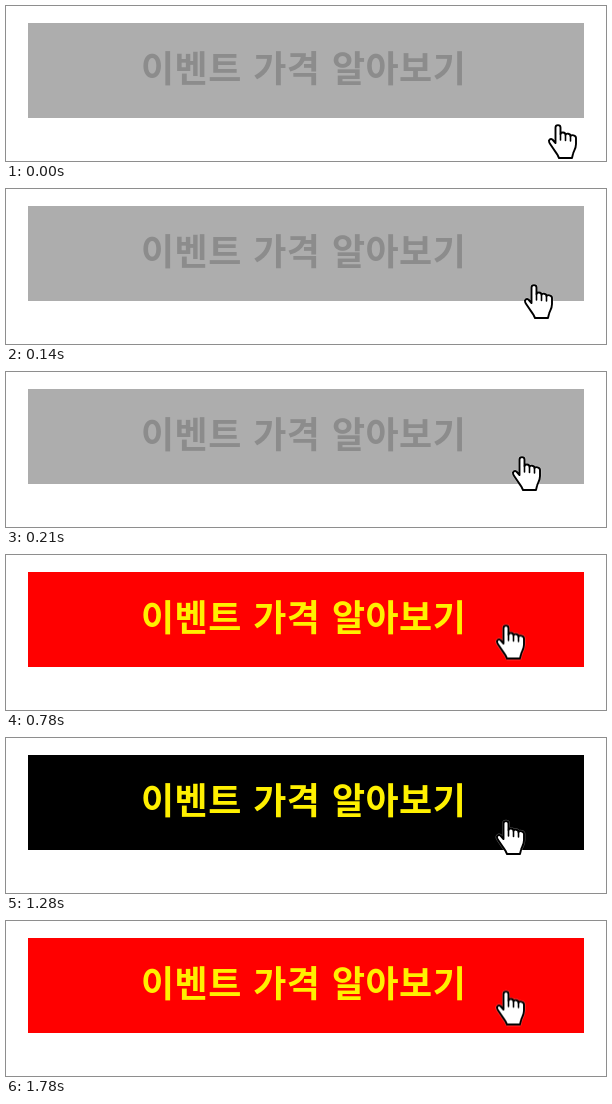
Animation, 600 px wide and 155 px high, one loop 2280 ms. Source, as an HTML page:

```html
<!DOCTYPE html>
<html lang="ko">
<head>
<meta charset="utf-8">
<style>
  html, body { margin: 0; width: 100%; height: 100%; overflow: hidden; background: #fff; }
  svg { display: block; width: 600px; height: 155px; }
  .bar, .label, .hand { animation: 2280ms step-end infinite; }
  .bar { animation-name: bar; }
  .label {
    font: 700 36px "Noto Sans CJK KR", "Noto Sans CJK", "Noto Sans CJK JP", sans-serif;
    letter-spacing: .48px;
    word-spacing: .9px;
    animation-name: label;
  }
  .hand { stroke-linecap: round; stroke-linejoin: round; animation-name: hand; }

  @keyframes bar {
    0% { fill: #adadad; }
    12.28%, 56.14% { fill: #000; }
    34.21%, 78.07%, 100% { fill: #f00; }
  }
  @keyframes label {
    0% { fill: #8c8c8c; }
    12.28%, 100% { fill: #fff000; }
  }
  @keyframes hand {
    0% { transform: translate(542px, 118px); }
    3.07% { transform: translate(530px, 107px); }
    6.14% { transform: translate(518px, 95px); }
    9.21% { transform: translate(506px, 84px); }
    12.28%, 56.14% { transform: translate(490px, 82px); }
    34.21%, 78.07%, 100% { transform: translate(490px, 69.5px); }
  }
</style>
</head>
<body>
<svg viewBox="0 0 600 155">
  <defs>
    <path id="palm" d="M7.5 19V3.6a2.5 2.5 0 0 1 5 0V10c.4-2.2 5-2 5 .8c.6-1.8 5-1.4 5 1.2c.8-1.4 5.5-1 5.5 2V20c0 5-2.4 7-2.9 9.5L24 34H11L9.6 31C8 28.5 4 23 1.3 18.5c-1.3-2.6 1.3-4.3 3.1-3z"/>
  </defs>
  <rect class="bar" x="22" y="17" width="556" height="95"/>
  <text class="label" x="135" y="76">이벤트 가격 알아보기</text>
  <g class="hand">
    <use href="#palm" fill="none" stroke="#fff" stroke-width="2.8" opacity=".35"/>
    <use href="#palm" fill="#fff" stroke="#000" stroke-width="1.9"/>
    <path d="M12.5 10v6M17.5 11v5.5M22.5 12v5" fill="none" stroke="#000" stroke-width="1.6"/>
  </g>
</svg>
</body>
</html>
```
